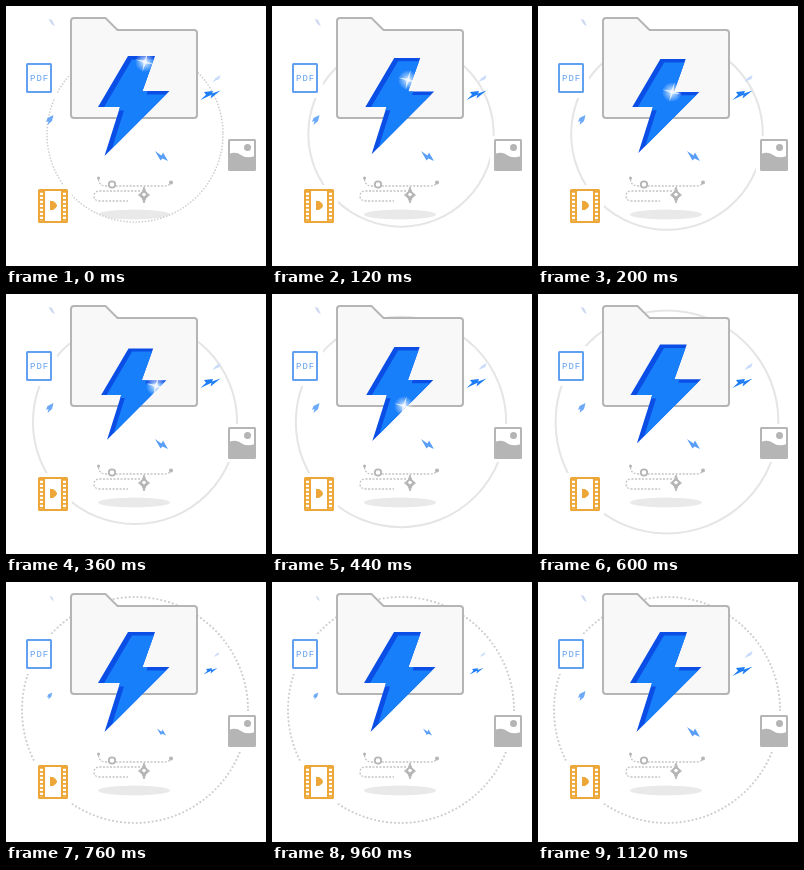
These frames come from a looping animation (260 px wide and 260 px high, 1.96 s). An HTML page:

```html
<!DOCTYPE html>
<html lang="en">
<head>
<meta charset="utf-8">
<title>Folder boost</title>
<style>
html, body { margin: 0; width: 100%; height: 100%; overflow: hidden; background: #fff; }
svg { display: block; width: 260px; height: 260px; }
text { font: 9px "Liberation Mono", monospace; letter-spacing: 1px; }
</style>
</head>
<body>
<svg viewBox="0 0 260 260" fill="none">
  <defs>
    <path id="boltShape" d="M122 50H149L136.5 85H163.5L98.500 150L114 101H92Z"/>
    <clipPath id="boltClip"><use href="#boltShape"/></clipPath>
    <clipPath id="ringClip"><circle id="disc" cx="129" cy="128"/></clipPath>
    <radialGradient id="glow">
      <stop stop-color="#fff" stop-opacity=".95"/>
      <stop offset=".3" stop-color="#fff" stop-opacity=".6"/>
      <stop offset="1" stop-color="#fff" stop-opacity="0"/>
    </radialGradient>
  </defs>

  <ellipse cx="128" cy="208.500" rx="36" ry="5" fill="#e9e9e9" clip-path="url(#ringClip)"/>
  <circle id="ring" cx="129" cy="128"/>

  <!-- White margins that interrupt the ring -->
  <g fill="#fff">
    <rect x="15" y="52" width="36" height="40"/>
    <rect x="27" y="179" width="39" height="42"/>
    <rect x="218" y="130" width="36" height="38"/>
  </g>

  <path d="M68 12H99.500L111.500 24H188Q191 24 191 27V109Q191 112 188 112H68Q65 112 65 109V15Q65 12 68 12Z" fill="#f8f8f8" stroke="#b5b5b5" stroke-width="2"/>

  <!-- Route -->
  <g stroke="#c4c4c4" stroke-width="1.300" stroke-dasharray="2 1.500">
    <path d="M92.500 173Q93 180 100 180H157Q163 180 165 177"/>
    <path d="M134 185H94Q88 185 88 190T94 195H122"/>
  </g>
  <g fill="#b5b5b5">
    <circle cx="92.500" cy="172" r="1.500"/>
    <circle cx="165" cy="176.500" r="2"/>
    <path d="M138 181Q139 187 143.500 189Q139 191 138 197Q137 191 132.500 189Q137 187 138 181Z" stroke="#b5b5b5"/>
  </g>
  <circle cx="106" cy="178.500" r="3.200" fill="#fff" stroke="#b5b5b5" stroke-width="1.800"/>
  <circle cx="138" cy="188.500" r="1.800" fill="#fff"/>

  <!-- Document -->
  <rect x="21" y="58" width="24" height="28" rx=".5" fill="#fff" stroke="#62a0f0" stroke-width="2"/>
  <text x="24" y="75" fill="#62a0f0">PDF</text>

  <!-- Film -->
  <g stroke="#eda739" stroke-width="2">
    <rect x="33" y="184" width="28" height="32" rx=".5" fill="#fff"/>
    <path d="M38 184V216M56 184V216"/>
    <path d="M35.500 185V216M58.500 185V216" stroke-width="4" stroke-dasharray="1.800 2.200"/>
  </g>
  <path d="M44 195H47Q51 197.500 51 199.500T47 204H44Z" fill="#eda739"/>

  <!-- Picture -->
  <rect x="223" y="134" width="26" height="30" rx=".5" fill="#fff" stroke="#b5b5b5" stroke-width="2"/>
  <circle cx="241.500" cy="141.500" r="3.500" fill="#b5b5b5"/>
  <path d="M223 148Q230 145 235 149T249 150V164H223Z" fill="#b5b5b5"/>

  <g id="sparks"></g>

  <g id="bolt">
    <use href="#boltShape" fill="#0b4ee6"/>
    <g clip-path="url(#boltClip)"><use href="#boltShape" x="4" y="3.500" fill="#187ffb"/></g>
  </g>
  <g id="glint">
    <circle r="10" fill="url(#glow)"/>
    <path d="M0-10L1.200-1.200L10 0L1.200 1.200L0 10L-1.200 1.200L-10 0L-1.200-1.200Z" fill="#fff" fill-opacity=".7" transform="rotate(15)"/>
  </g>
</svg>
<script>
const LOOP = 1960, STEP = 40;
const $ = id => document.getElementById(id);
const ring = $("ring"), disc = $("disc"), bolt = $("bolt"), glint = $("glint");

// Each spark: centre, colour, outline relative to the centre
const sparks = [
  [46, 16.5, "#ccd7f0", "M-3.500-3.500L0-2.500L3 4L-.5 1.500Z"],
  [210.5, 72.5, "#c8dcfa", "M4-3.500L3 .5L-4 3.500L-1-.5Z"],
  [204.5, 89, "#1f7df6", "M-6.500-3L2.500-4L1.500-1.500L10-4.500L0 3.500L1-.2L-10 5L-4.500-.2Z"],
  [43.5, 114, "#6ca9f7", "M4-5L2.500 1L-2 5L-1 1L-3.500 2L-2-2Z"],
  [155.5, 150, "#5a9ff7", "M-6.500-5L0-.5L1.500-3.500L6.500 5L1 2.500L-1 4.500Z"]
].map(([x, y, fill, d]) => {
  const el = document.createElementNS("http://www.w3.org/2000/svg", "path");
  el.setAttribute("d", d);
  el.setAttribute("fill", fill);
  $("sparks").append(el);
  return { el, x, y };
});

// Time, x, y along the bolt's right edge
const glintPath = [[0, 139, 56], [200, 134, 86], [300, 152, 87], [360, 150, 92], [440, 132, 112], [560, 103, 143]];

function along(path, t) {
  const i = Math.max(1, path.findIndex(p => p[0] >= t));
  const a = path[i - 1], b = path[i], k = (t - a[0]) / (b[0] - a[0]);
  return [a[1] + (b[1] - a[1]) * k, a[2] + (b[2] - a[2]) * k];
}

// Linear 0 -> 1 -> 0 between two times
const tent = (t, from, to) => Math.max(0, 1 - Math.abs(2 * (t - from) / (to - from) - 1));

function drawRing(t) {
  const r = 88 + 25 * Math.min(1, t / 640);
  const dotted = t === 0 || t >= 640, k = r / 113;
  const attrs = {
    r,
    stroke: dotted ? "#cecece" : "#e5e5e5",
    "stroke-width": dotted ? 2.2 * k : 2,
    "stroke-linecap": dotted ? "round" : "butt",
    "stroke-dasharray": dotted ? `0 ${2 * Math.PI * r / 178}` : "none"
  };
  for (const name in attrs) ring.setAttribute(name, attrs[name]);
  disc.setAttribute("r", r);
}

function draw(t) {
  drawRing(t);

  const size = 1 - 0.1 * tent(t, 0, 640);
  bolt.setAttribute("transform", `translate(128 100) scale(${size}) translate(-128 -100)`);

  const shining = t <= 560;
  glint.setAttribute("visibility", shining ? "visible" : "hidden");
  if (shining) glint.setAttribute("transform", `translate(${along(glintPath, t)})`);

  const spark = 1 - 0.5 * tent(t, 600, 1120);
  for (const { el, x, y } of sparks) el.setAttribute("transform", `translate(${x} ${y}) scale(${spark})`);
}

const start = performance.now();
function tick() {
  const t = (performance.now() - start) % LOOP;
  draw(Math.floor(t / STEP) * STEP);
  requestAnimationFrame(tick);
}
tick();
</script>
</body>
</html>
```
